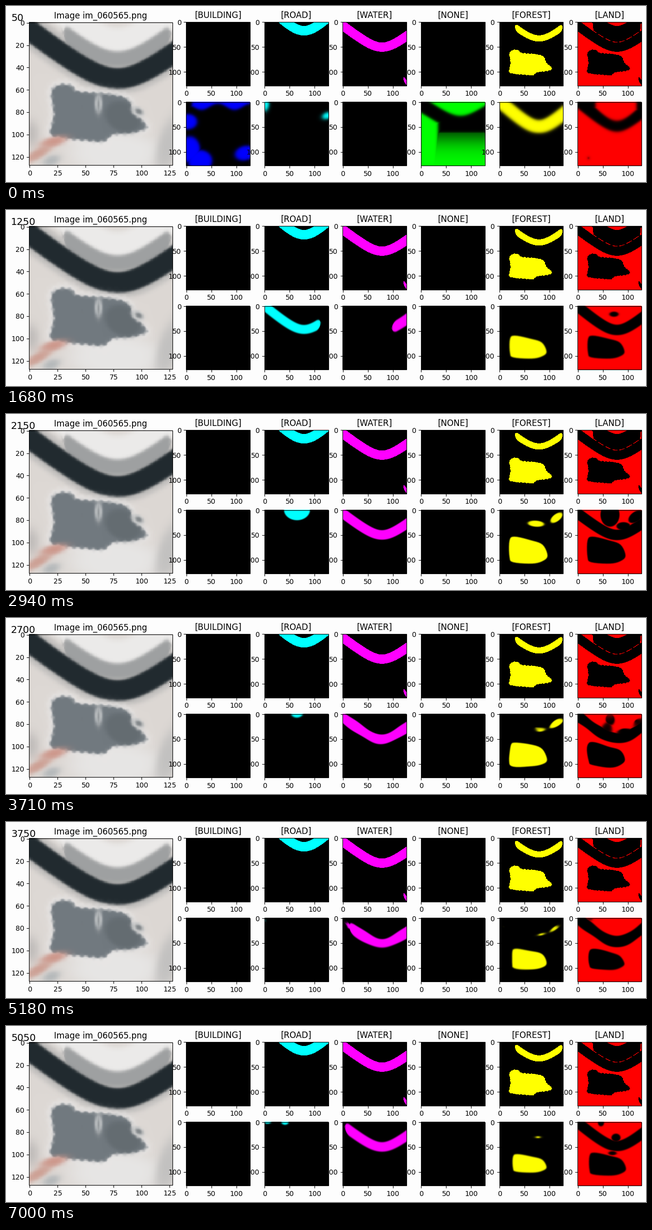
Recreate the animation shown at these times as a matplotlib script. Size 1280x353 px, loop 7.07 s.

```python
import numpy as np
import matplotlib.pyplot as plt
from matplotlib.animation import FuncAnimation
from matplotlib.patches import Rectangle
from matplotlib.path import Path

W, H, DPI = 1280, 353, 100
N, FRAMES, STEP_MS = 128, 101, 70
FAR = 12
KEYS = [0, 13, 24, 42, 64, 83, 100]
SOFT = [1.8, 0.9, 0.7, 0.5, 0.5, 0.8, 0.7]
COLORS = {"BUILDING": (0, 0, 1), "ROAD": (0, 1, 1), "WATER": (1, 0, 1),
          "NONE": (0, 1, 0), "FOREST": (1, 1, 0), "LAND": (1, 0, 0)}

plt.rcParams["font.family"] = "DejaVu Sans"
gx, gy = np.meshgrid(np.arange(N) + 0.5, np.arange(N) + 0.5)
grid = np.column_stack([gx.ravel(), gy.ravel()])


# Every shape is a field on the grid: about its distance in pixels, positive inside.
def valley(steep=24, dy=0):
    """Hyperbola that all river bends follow."""
    return 50.5 + dy - steep * (np.hypot(1, (gx - 79) / 30) - 1)


def band(half, lo=-40, hi=170, steep=24, dy=0):
    """Round-ended stripe along the valley."""
    y = valley(steep, dy)
    off = np.abs(gy - y) / np.hypot(1, np.gradient(y, axis=1))
    end = np.minimum(gx - lo, hi - gx)
    t = np.clip(end / half, 0, 1)
    return np.minimum(half * np.sqrt(t * (2 - t)) - off, end)


def oval(x, y, rx, ry, tilt=0):
    t = np.radians(tilt)
    u = (gx - x) * np.cos(t) + (gy - y) * np.sin(t)
    v = (gy - y) * np.cos(t) - (gx - x) * np.sin(t)
    return (1 - np.hypot(u / rx, v / ry)) * min(rx, ry)


def outline(pts, sub=5):
    """Closed Catmull-Rom shape through the points."""
    b = np.array(pts, float)
    a, c, d = np.roll(b, 1, 0), np.roll(b, -1, 0), np.roll(b, -2, 0)
    t = np.linspace(0, 1, sub, endpoint=False)[:, None, None]
    p = 0.5 * (2 * b + (c - a) * t + (2 * a - 5 * b + 4 * c - d) * t ** 2
               + (3 * b - a - 3 * c + d) * t ** 3)
    p = p.transpose(1, 0, 2).reshape(-1, 2)
    best = np.full((N, N), np.inf)
    for (px, py), (vx, vy) in zip(p, np.roll(p, -1, 0) - p):
        rx, ry = gx - px, gy - py
        s = np.clip((rx * vx + ry * vy) / (vx * vx + vy * vy + 1e-9), 0, 1)
        best = np.minimum(best, np.hypot(rx - s * vx, ry - s * vy))
    return np.where(Path(p).contains_points(grid).reshape(N, N), best, -best)


def wood(x0, x1, y0, y1):
    """Predicted wood: a block with a sloping top, fitted to a box."""
    unit = np.array([(0, 0.15), (0.13, 0), (0.55, 0.13), (0.87, 0.3), (1, 0.7),
                     (0.88, 0.9), (0.6, 1), (0.1, 0.95), (0, 0.75)])
    return outline(unit * (x1 - x0, y1 - y0) + (x0, y0))


def join(*shapes):
    return np.clip(np.maximum.reduce(shapes), -FAR, FAR)


def without(*shapes):
    return -join(*shapes)


def step(field, soft):
    return 0.5 + 0.5 * np.tanh(field / (2 * soft))


# True masks
river = band(9.3)
road = band(9.5, steep=30, dy=-33)
verge = band(6.2, 31, 126, steep=26, dy=-17.5)
copse = outline([(20, 62), (28, 56), (38, 57), (44, 62), (75, 65), (89, 70), (93, 81),
                 (105, 94), (92, 99), (75, 101), (66, 107), (50, 106), (24, 103),
                 (19, 98), (22, 83)])
copse += 0.7 * np.sin(gx * 0.9) * np.cos(gy * 0.8)
sliver = oval(126, 119, 2.5, 9, -25)
seam = (verge + river > -4) & (river < 0) & (river > -1.2) & (gx % 14 < 10)
closed = (verge + road > -5) | (verge + river > -4)
water, trees = join(river, sliver) > 0, join(verge, copse) > 0
truth = {"BUILDING": np.zeros((N, N), bool), "ROAD": road > 0, "WATER": water,
         "NONE": np.zeros((N, N), bool), "FOREST": trees,
         "LAND": seam | ~((road > 0) | water | trees | closed)}

# Predicted masks at the key times; absent means empty
arc = band(10.5, steep=26, dy=-2)
wave = np.minimum(10 + 6 * np.cos(2 * np.pi * (gx - 97) / 66) - gy, gx - 12)
west = np.minimum(gy - 22 - 0.6 * gx, 34 - gx)
south = np.minimum(gy - 64, 1.2 + (gy - 80) * 0.12)
inner = np.minimum(valley(35, -12.5) - gy, np.minimum(gx - 36, 118 - gx))
masks = {
    "BUILDING": {0: join(wave, oval(4, 40, 18, 15), oval(8, 96, 20, 26),
                         oval(28, 118, 24, 21), oval(118, 103, 20, 14, -15))},
    "ROAD": {0: join(oval(0, 4, 9, 14), oval(125, 28, 9, 6, -20)),
             1: band(12, 35, 118, dy=-6),
             2: band(9, hi=112, steep=26, dy=-3),
             3: oval(65, 0, 26, 21),
             5: join(oval(0, 6, 10, 13), oval(41, 1, 6, 4)),
             6: join(oval(6, 0, 7, 4), oval(41, 1, 7, 5))},
    "WATER": {1: join(band(9, hi=62), band(10.5, lo=92)),
              2: band(10, lo=99, dy=-1),
              3: band(9.5),
              4: band(8.5),
              5: band(10, lo=15),
              6: band(9.5, lo=5)},
    "NONE": {0: join(valley(22, -22.5) - gy, west, south)},
    "FOREST": {0: band(13, steep=28, dy=-1),
               1: join(oval(30, 69, 3, 1.4), oval(76, 95, 4, 1, -25)) - 0.7,
               2: wood(21, 94, 60, 106),
               3: join(wood(20, 96, 54, 108), oval(73, 28, 16, 6, 4),
                       oval(114, 16, 14, 7, -38)),
               4: join(wood(21, 94, 59, 106), oval(82, 34, 13, 5, -10),
                       oval(112, 22, 15, 2.5, -28)),
               5: join(wood(28, 93, 64, 102), oval(8, 18, 9, 7),
                       oval(85, 33, 7, 2, -14), oval(110, 20, 10, 3, -42)),
               6: join(wood(27, 94, 65, 102), oval(77, 31, 4, 1.5))},
    "LAND": {0: np.minimum(join(gy - valley(26, 9.5), inner),
                           without(oval(22, 113, 9, 9) - 9.5)),
             1: without(arc),
             2: without(arc, wood(21, 94, 60, 106), oval(73, 17, 9, 5)),
             3: without(band(10.5), wood(20, 96, 54, 108), oval(65, 10, 19, 24),
                        oval(92, 33, 14, 8), oval(117, 14, 17, 10, -35)),
             4: without(arc, wood(22, 94, 62, 105)),
             5: without(arc, wood(26, 95, 63, 104), oval(29, 2, 7, 3),
                        oval(128, 115, 3, 10)),
             6: without(arc, wood(24, 97, 62, 108), oval(47, 2, 6, 7),
                        oval(77, 32, 9, 8), oval(70, 63, 8, 4))},
}
empty = np.full((N, N), -float(FAR))
fields = {c: [masks[c].get(k, empty) for k in range(len(KEYS))] for c in COLORS}


def aerial():
    """Flat-toned view of the river, its banks and the wood."""
    img = np.ones((N, N, 3)) * (221, 216, 212)

    def paint(field, tone, soft=0.6, alpha=1):
        a = alpha * step(field, soft)[..., None]
        img[:] = img * (1 - a) + a * np.array(tone)

    paint(road + 3, (236, 235, 234), 1.5)
    paint(oval(78, 117, 40, 17), (231, 230, 229), 2.5)
    paint(river + 5, (194, 192, 190), 1.2)
    paint(verge + 0.5, (158, 160, 161), 0.8)
    paint(river, (33, 42, 47))
    paint(copse + 3, (233, 231, 230), 1.5)
    paint(copse, (113, 121, 127))
    paint(np.minimum(copse, oval(84, 85, 17, 13, 30)), (97, 105, 110), 1, 0.8)
    paint(oval(62, 73, 3, 8), (210, 212, 213))
    paint(oval(62, 74, 1, 5), (130, 136, 140))
    paint(oval(97, 80, 6, 4, 30), (205, 206, 206))
    paint(oval(98, 80, 3, 2, 30), (125, 130, 133))
    paint(oval(2, 100, 6, 10), (193, 189, 187), 2)
    paint(oval(124, 110, 9, 24, 15), (194, 193, 192), 2)
    paint(oval(22, 107, 11, 4, -15), (205, 150, 138), 1)
    paint(oval(8, 118, 13, 4, -30), (205, 160, 148), 1)
    paint(oval(20, 124, 7, 4, -20), (180, 184, 186), 1.2)
    return img / 255


fig = plt.figure(figsize=(W / DPI, H / DPI), dpi=DPI, facecolor="#fdfdfd")
ax = fig.add_axes([0, 0, 1, 1])
TICK, GAP, LINE = 3.5 * DPI / 72, 7 * DPI / 72, 0.8
tick_x, tick_y = [], []


def panel(x, y, size, img, xticks, yticks, title=None):
    """Framed image with ticks, drawn in stage pixels."""
    art = ax.imshow(img, extent=(x, x + size, y + size, y), aspect="auto",
                    interpolation="nearest")
    ax.add_patch(Rectangle((x, y), size, size, fill=False, lw=LINE, zorder=3))
    scale, end = size / N, y + size
    for v in xticks:
        p = x + (v + 0.5) * scale
        tick_x.extend([p, p, np.nan])
        tick_y.extend([end, end + TICK, np.nan])
        ax.text(p, end + GAP, str(v), size=10, ha="center", va="top")
    for v in yticks:
        p = y + (v + 0.5) * scale
        tick_x.extend([x, x - TICK, np.nan])
        tick_y.extend([p, p, np.nan])
        ax.text(x - GAP, p, str(v), size=10, ha="right", va="center_baseline")
    if title:
        ax.text(x + size / 2, y - 6 * DPI / 72, title, size=12, ha="center")
    return art


panel(46.3, 32.8, 286.5, aerial(), range(0, 126, 25), range(0, 121, 20),
      "Image im_060565.png")
views = {}
for n, (cls, rgb) in enumerate(COLORS.items()):
    x, size, marks = 360.2 + 156.6 * n, 127.8, (0, 50, 100)
    panel(x, 31.9, size, truth[cls][..., None] * np.array(rgb, float), marks, marks,
          f"[{cls}]")
    views[cls] = panel(x, 192.55, size, np.zeros((N, N, 3)), marks, marks)
ax.plot(tick_x, tick_y, color="black", lw=LINE, solid_capstyle="butt")
counter = ax.text(10, 30, "", size=14)
ax.set(xlim=(0, W), ylim=(H, 0))
ax.axis("off")


def update(i):
    k = min(np.searchsorted(KEYS, i, side="right") - 1, len(KEYS) - 2)
    u = (i - KEYS[k]) / (KEYS[k + 1] - KEYS[k])
    soft = np.interp(i, KEYS, SOFT)
    # training jitter between the key times
    a, b = np.random.default_rng(i).uniform(0, 2 * np.pi, 2)
    jitter = 1.8 * np.sin(np.pi * u) * np.sin(gx / 15 + a) * np.cos(gy / 13 + b)
    for cls, view in views.items():
        f = (1 - u) * fields[cls][k] + u * fields[cls][k + 1] + jitter
        view.set_data(step(f, soft)[..., None] * np.array(COLORS[cls], float))
    counter.set_text(str(50 * (i + 1)))
    return [*views.values(), counter]


anim = FuncAnimation(fig, update, frames=FRAMES, interval=STEP_MS, repeat=True,
                     repeat_delay=0, blit=False)
plt.show()
```
